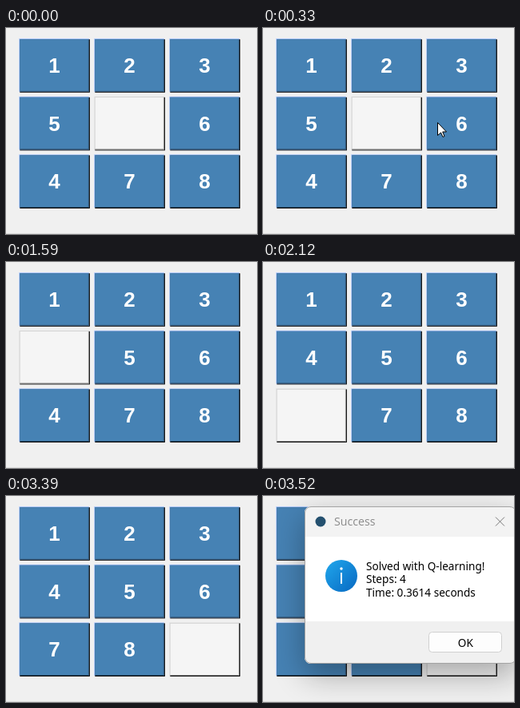
Recreate the animation shown at these times as an HTML page with a canvas. Size 314 by 258 pixels, loop 3.59 s.

```html
<!DOCTYPE html>
<html lang="en">
<head>
<meta charset="utf-8">
<title>Eight puzzle</title>
<style>
html, body { margin: 0; width: 100%; height: 100%; overflow: hidden; background: #f0f0f0; }
canvas { display: block; }
</style>
</head>
<body>
<canvas id="stage" width="314" height="258"></canvas>
<script>
const ctx = document.getElementById('stage').getContext('2d');
const LOOP = 3590;
const LEFT = 16.3, TOP = 13.2, PITCH_X = 94, PITCH_Y = 72.6;
const TILE_W = 88.6, TILE_H = 67.6;
// Board after each move; 0 is the gap.
const BOARDS = [
  [0, '123506478'],
  [1590, '123056478'],
  [2120, '123456078'],
  [2600, '123456708'],
  [3390, '123456780']
];
const CURSOR = [330, 400], DIALOG_AT = 3520;

function rect(color, x, y, w, h) {
  ctx.fillStyle = color;
  ctx.fillRect(x, y, w, h);
}

function text(string, x, y, font, color, align = 'left') {
  ctx.font = font;
  ctx.fillStyle = color;
  ctx.textAlign = align;
  ctx.fillText(string, x, y);
}

function rounded(x, y, w, h, r) {
  ctx.beginPath();
  ctx.roundRect(x, y, w, h, r);
}

// A raised button: light top and left, dark inner and black outer edge.
function tile(digit, x, y) {
  const gap = digit === '0';
  const [light, dark, face] = gap ? ['#dcdcdc', '#939393', '#f5f5f5'] : ['#a2c0fc', '#2a4e6c', '#4682b4'];
  rect('#000', x + 1, y + 1, TILE_W - 1, TILE_H - 1);
  rect(light, x, y, TILE_W - 1, TILE_H - 1);
  rect(dark, x + 1, y + 1, TILE_W - 2, TILE_H - 2);
  rect(face, x + 1, y + 1, TILE_W - 3, TILE_H - 3);
  if (!gap) text(digit, x + 44.2, y + 42.7, 'bold 26px "Liberation Sans", Arial, sans-serif', '#fff', 'center');
}

function cursor(x, y) {
  const points = [[0, 0], [0, 16], [4, 12.5], [6.5, 18], [8.5, 17], [6.2, 11.5], [11, 11.5]];
  ctx.beginPath();
  for (const [dx, dy] of points) ctx.lineTo(x + dx, y + dy);
  ctx.closePath();
  ctx.fillStyle = '#fff';
  ctx.fill();
  ctx.strokeStyle = '#000';
  ctx.lineWidth = 1;
  ctx.stroke();
}

function infoIcon(x, y) {
  const blue = ctx.createLinearGradient(x - 14, y - 14, x + 14, y + 14);
  blue.addColorStop(0, '#1d9ee6');
  blue.addColorStop(1, '#0b72c8');
  ctx.fillStyle = blue;
  ctx.beginPath();
  ctx.arc(x, y, 20, 0, 7);
  ctx.fill();
  rect('#fff', x - 1, y - 4, 2, 14);
  ctx.beginPath();
  ctx.arc(x, y - 9, 1.7, 0, 7);
  ctx.fill();
}

function dialog() {
  ctx.save();
  ctx.shadowColor = 'rgba(0,0,0,.32)';
  ctx.shadowBlur = 38;
  ctx.shadowOffsetY = 14;
  ctx.fillStyle = '#fff';
  rounded(52, 13, 264, 197, 8);
  ctx.fill();
  ctx.restore();

  ctx.save();
  ctx.clip();
  rect('#f3f3f3', 52, 13, 264, 38);
  rect('#f0f0f0', 52, 157, 264, 54);
  ctx.restore();
  ctx.lineWidth = 1;
  ctx.strokeStyle = '#a4a4a4';
  rounded(52.5, 13.5, 264, 196, 7.5);
  ctx.stroke();

  ctx.fillStyle = '#24506f';
  ctx.beginPath();
  ctx.arc(72, 32, 6.5, 0, 7);
  ctx.fill();
  text('Success', 89, 37, '14.2px "Open Sans", sans-serif', '#8a8a8a');
  ctx.strokeStyle = '#777';
  ctx.beginPath();
  ctx.moveTo(291, 26.5); ctx.lineTo(302, 37.5);
  ctx.moveTo(302, 26.5); ctx.lineTo(291, 37.5);
  ctx.stroke();

  infoIcon(98, 100);
  const font = '13.6px "Noto Sans", sans-serif';
  ['Solved with Q-learning!', 'Steps: 4', 'Time: 0.3614 seconds']
    .forEach((line, i) => text(line, 129, 93 + i * 16.3, font, '#000'));

  ctx.fillStyle = '#fdfdfd';
  ctx.strokeStyle = '#d0d0d0';
  rounded(207.5, 170.5, 91, 25, 4);
  ctx.fill();
  ctx.stroke();
  text('OK', 253.3, 188.5, font, '#000', 'center');
}

function draw(now) {
  const t = now % LOOP;
  rect('#f0f0f0', 0, 0, 314, 258);
  rect('#dcdcdc', 0, 257, 314, 1);
  const board = BOARDS.findLast(([start]) => t >= start)[1];
  [...board].forEach((digit, i) =>
    tile(digit, LEFT + i % 3 * PITCH_X, TOP + Math.floor(i / 3) * PITCH_Y));
  if (t >= CURSOR[0] && t < CURSOR[1]) cursor(218.5, 118.5);
  if (t >= DIALOG_AT) dialog();
}

const start = performance.now();
function frame() {
  draw(performance.now() - start);
  requestAnimationFrame(frame);
}
frame();
</script>
</body>
</html>
```
